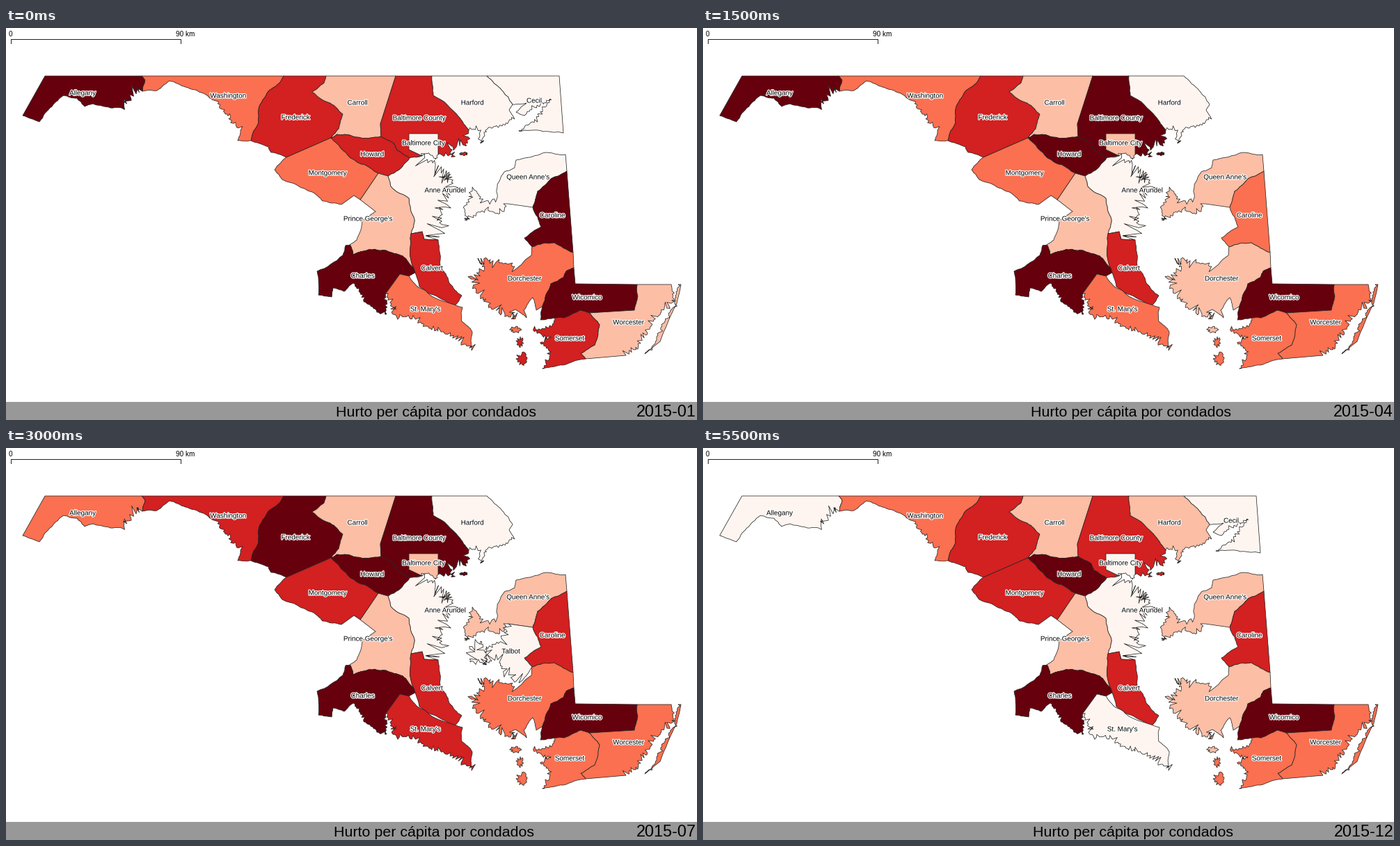
Animation, 993 px wide and 564 px high, one loop 6 s. Source, as a matplotlib script:

```python
import numpy as np
import matplotlib.pyplot as plt
from matplotlib.animation import FuncAnimation
from matplotlib.patches import PathPatch, Rectangle
from matplotlib.path import Path
from matplotlib.patheffects import withStroke

W, H, DPI = 993, 564, 96
PX = 72 / DPI
REDS = ["#fff5f0", "#fcbea5", "#fb7050", "#d32020", "#67000d"]
ABSENT = -1
INK = "#232323"
TOP = 69


def line(*xy):
    return np.array(xy, float).reshape(-1, 2)


def inward(d):
    """Normal pointing into a clockwise ring."""
    return np.stack([-d[:, 1], d[:, 0]], axis=1)


def rugged(*xy, rough=0.07):
    """Fractal line through key points, by midpoint displacement."""
    pts = line(*xy)
    rng = np.random.default_rng(int(pts.sum()))
    for _ in range(3):
        d = np.diff(pts, axis=0)
        mid = pts[:-1] + d / 2 + inward(d) * rng.uniform(-rough, rough, (len(d), 1))
        pts = np.insert(pts, np.arange(1, len(pts)), mid, axis=0)
    return pts


def creeks(*xy, depth=7, gap=2.3):
    """Coast with narrow slanted inlets of random depth."""
    base = rugged(*xy, rough=0.1)
    s = np.r_[0, np.cumsum(np.hypot(*np.diff(base, axis=0).T))]
    u = np.linspace(0, s[-1], 2 * int(s[-1] / gap / 2) + 1)
    pts = np.stack([np.interp(u, s, c) for c in base.T], axis=1)
    along = np.gradient(pts, axis=0)
    along /= np.hypot(*along.T)[:, None] + 1e-9
    rng = np.random.default_rng(int(base[0].sum()))
    push = depth * rng.uniform(-0.5, 1, (len(pts), 1))
    push[::2] = 0
    slant = push * rng.uniform(-0.6, 0.6, push.shape)
    return pts + push * inward(along) + slant * along


def island(x, y, w, h):
    a = np.linspace(0, 2 * np.pi, 24, endpoint=False)
    r = np.random.default_rng(int(x + y)).uniform(0.45, 1.15, len(a))
    return np.stack([x + w / 2 * r * np.cos(a), y + h / 2 * r * np.sin(a)], axis=1)


def ring(*parts):
    return np.vstack(parts)


def compound(rings):
    return Path.make_compound_path(*(Path(np.vstack([r, r[:1]]), closed=True) for r in rings))


# Shared borders
alle_wash = rugged(195, TOP, 200, 75, 196, 91)
wash_fred = rugged(399, TOP, 394, 78, 377, 91, 363, 117, 363, 136, 352, 162)
fred_carr = rugged(460, TOP, 457, 79, 440, 92, 466, 108, 484, 124, 478, 145, 467, 158)
fred_mont = line(467, 158, 403, 186)
carr_howa = rugged(467, 158, 476, 153, 503, 157, 539, 156)
carr_balt = line(560, TOP, 538, 138, 539, 156)
balt_harf = rugged(612, TOP, 614, 97, 651, 128, 665, 147)
balt_howa = rugged(539, 156, 558, 167, 562, 176, 580, 187)
mont_howa = rugged(467, 158, 495, 187, 535, 209)
howa_anne = rugged(580, 187, 565, 204, 549, 213)
howa_prin = line(535, 209, 549, 213)
mont_prin = line(535, 209, 512, 243)
prin_anne = rugged(549, 213, 553, 228, 579, 245, 587, 276, 582, 296)
prin_calv = rugged(582, 296, 586, 346)
prin_char = rugged(494, 312, 499, 326, 514, 321, 546, 320, 570, 328, 586, 346)
char_mary = line(545, 383, 566, 354, 579, 357)
anne_calv = line(582, 296, 598, 293, 601, 304, 621, 305)
harf_ceci = rugged(691, TOP, 713, 90, 728, 110)
quee_caro = rugged(806, 206, 783, 217, 764, 235, 757, 258)
quee_talb = line(757, 258, 722, 253)
talb_caro = rugged(757, 258, 769, 286, 745, 302, 756, 315)
caro_dorc = rugged(756, 315, 788, 309, 815, 323)
dorc_wico = rugged(816, 345, 805, 350, 801, 359, 783, 368, 771, 400)
wico_worc = rugged(907, 369, 908, 386, 903, 406)
wico_edge = line(903, 406, 838, 410)
wico_some = rugged(838, 410, 826, 406, 802, 417, 788, 417)
worc_some = rugged(838, 410, 853, 427, 846, 456, 826, 468, 833, 476)

shapes = {
    "Allegany": [ring(
        line(24, 126, 56, TOP), alle_wash, creeks(196, 91, 166, 115, depth=14),
        rugged(166, 115, 150, 115, 125, 109, 113, 113, 102, 101, 83, 97, 66, 113, 48, 135, 24, 126))],
    "Washington": [ring(
        wash_fred, rugged(352, 162, 333, 162, 337, 147), creeks(337, 147, 322, 128, 302, 105),
        rugged(302, 105, 284, 94, 258, 85, 235, 76, 217, 90, 196, 91), alle_wash[::-1])],
    "Frederick": [ring(
        fred_carr, fred_mont, rugged(403, 186, 381, 179, 377, 171, 352, 162), wash_fred[::-1])],
    "Carroll": [ring(carr_balt, carr_howa[::-1], fred_carr[::-1])],
    "Baltimore County": [
        ring(balt_harf, creeks(665, 147, 660, 166, 638, 174, 641, 186, 621, 182, depth=12),
             line(621, 160, 590, 160, 579, 175, 598, 184, 580, 187),
             balt_howa[::-1], carr_balt[::-1]),
        island(658, 181, 13, 5)],
    "Baltimore City": [ring(
        line(579, 175, 579, 152, 621, 152, 621, 182),
        creeks(621, 182, 619, 190, 604, 179, 598, 184, depth=5))],
    "Harford": [ring(
        harf_ceci, rugged(728, 110, 723, 118, 731, 131),
        creeks(731, 131, 692, 145, 682, 168, 679, 148, 665, 147), balt_harf[::-1])],
    "Cecil": [ring(
        harf_ceci[::-1], line(795, TOP, 801, 151), rugged(801, 151, 772, 149, 737, 148),
        creeks(737, 148, 760, 131, 784, 103, 745, 126, depth=6),
        rugged(745, 126, 733, 121, 748, 108, 728, 110))],
    "Howard": [ring(carr_howa, balt_howa, howa_anne, howa_prin[::-1], mont_howa[::-1])],
    "Montgomery": [ring(
        mont_howa, mont_prin, line(509, 247, 500, 241, 482, 254),
        rugged(482, 254, 455, 249, 440, 236, 397, 218, 386, 204, 403, 186), fred_mont[::-1])],
    "Anne Arundel": [ring(
        rugged(580, 187, 598, 184),
        creeks(598, 184, 620, 197, 639, 208, 643, 228, 636, 245, 624, 268, 625, 290, 621, 305,
               depth=22),
        anne_calv[::-1], prin_anne[::-1], howa_anne[::-1])],
    "Prince George's": [ring(
        howa_prin, prin_anne, prin_calv, prin_char[::-1],
        rugged(494, 312, 504, 305, 512, 277), line(531, 264, 509, 247), mont_prin[::-1])],
    "Queen Anne's": [ring(
        line(804, 182, 806, 206), quee_caro, quee_talb,
        creeks(722, 253, 708, 268, 690, 261, 658, 277, 671, 232, 690, 250, 706, 244, depth=9),
        rugged(706, 244, 706, 225, 716, 207, 731, 201, 733, 190, 776, 179, 804, 182))],
    "Caroline": [ring(quee_caro[::-1], line(815, 323), caro_dorc[::-1], talb_caro[::-1])],
    "Talbot": [
        ring(quee_talb[::-1], talb_caro, rugged(756, 315, 737, 338),
             creeks(737, 338, 715, 322, 706, 304, 690, 312, 688, 287, 710, 281, 722, 253, depth=15)),
        ring(creeks(690, 312, 667, 308, 666, 290, 682, 278, 690, 295, depth=11))],
    "Calvert": [ring(
        anne_calv, rugged(621, 305, 624, 342, 637, 367, 655, 385, 644, 401),
        rugged(644, 401, 622, 388, 594, 372, 586, 346), prin_calv[::-1])],
    "Charles": [ring(
        prin_char, line(588, 352, 579, 357), char_mary[::-1],
        creeks(545, 383, 547, 413, 527, 403, 511, 388, 499, 367, depth=4),
        rugged(499, 367, 486, 379, 470, 374, 468, 387, 449, 384, 447, 350, 484, 327, 488, 313,
               494, 312))],
    "St. Mary's": [ring(
        char_mary, rugged(579, 357, 590, 371, 612, 386, 656, 402),
        rugged(656, 402, 655, 422, 670, 437, 669, 464),
        creeks(669, 464, 634, 441, 598, 424, 577, 416, 556, 412, 545, 383, depth=10))],
    "Dorchester": [
        ring(caro_dorc, dorc_wico,
             rugged(771, 400, 762, 406, 757, 388, 744, 406, 748, 417, 732, 405),
             creeks(732, 405, 732, 420, 700, 405, 676, 379, 668, 357, 688, 348, 678, 331,
                    706, 338, 735, 345, depth=11),
             rugged(735, 345, 755, 327, 756, 315)),
        island(732, 434, 16, 10)],
    "Wicomico": [ring(
        line(816, 345, 818, 368, 907, 369), wico_worc, wico_edge, wico_some,
        rugged(788, 417, 768, 420, 771, 400), dorc_wico[::-1])],
    "Worcester": [
        ring(wico_worc[::-1],
             creeks(956, 369, 955, 398, 932, 420, 917, 446, 891, 471, depth=9),
             line(833, 476), worc_some[::-1], wico_edge[::-1]),
        ring(rugged(966, 369, 970, 369, 964, 396, 940, 451, 918, 469, rough=0.02),
             creeks(918, 469, 940, 436, 963, 388, 966, 369, depth=4))],
    "Somerset": [
        ring(wico_some,
             creeks(788, 417, 783, 431, 757, 434, 785, 445, 768, 454, 784, 466, 771, 490,
                    depth=5),
             rugged(771, 490, 805, 484, 833, 476), worc_some[::-1]),
        island(739, 452, 11, 14), island(742, 476, 17, 20)],
}

# Label centre, usual colour class and the months that depart from it
counties = {
    "Allegany": (110, 93, 4, {3: [2], 2: [7], 1: [8], 0: range(9, 13)}),
    "Washington": (319, 97, 2, {1: [3], 3: [5, 6, 7]}),
    "Frederick": (416, 128, 3, {4: [5, 6, 7]}),
    "Carroll": (505, 107, 1, {2: [5, 10]}),
    "Baltimore County": (593.5, 129, 4, {3: [1, 12]}),
    "Baltimore City": (600, 165, 0, {1: range(3, 8)}),
    "Harford": (670, 107, 0, {1: [12]}),
    "Cecil": (759, 104, 0, {ABSENT: range(4, 9)}),
    "Howard": (526, 181, 4, {3: [1]}),
    "Montgomery": (462, 208, 3, {2: range(1, 6)}),
    "Anne Arundel": (631, 233, 0, {1: [6]}),
    "Prince George's": (520, 274, 1, {2: [6]}),
    "Queen Anne's": (750, 214, 1, {0: [1]}),
    "Caroline": (785, 269, 3, {4: [1, 10, 11], 2: [3, 4, 5, 8]}),
    "Talbot": (725.5, 292, ABSENT, {0: range(6, 11)}),
    "Calvert": (612, 345, 3, {4: [5]}),
    "Charles": (512.5, 356, 4, {}),
    "St. Mary's": (602.5, 404, 2, {3: [6, 7, 10], 0: [12]}),
    "Dorchester": (745, 360, 2, {1: [3, 4, 12], 0: [5], 3: [6]}),
    "Wicomico": (835, 387, 4, {}),
    "Worcester": (894.5, 423, 2, {1: [1, 5]}),
    "Somerset": (810, 446, 2, {3: [1, 5], 0: [3]}),
}

fig = plt.figure(figsize=(W / DPI, H / DPI), dpi=DPI, facecolor="white")
ax = fig.add_axes([0, 0, 1, 1])
ax.set(xlim=(0, W), ylim=(H, 0))
ax.axis("off")


def text(x, y, s, size, **kw):
    return ax.text(x, y, s, fontsize=size * PX, family="Liberation Sans", color="black",
                   va="baseline", **kw)


halo = [withStroke(linewidth=2.4 * PX, foreground="white")]
areas, labels = {}, {}
for name, (x, y, *_) in counties.items():
    areas[name] = ax.add_patch(PathPatch(compound(shapes[name]), ec=INK, lw=0.75 * PX,
                                         joinstyle="round", zorder=2))
    labels[name] = text(x, y + 3.5, name, 9.9, ha="center", path_effects=halo, zorder=4)

ax.plot([6.5, 6.5, 250.5, 250.5], [21.5, 15.5, 15.5, 21.5], color=INK, lw=PX)
text(6.5, 12, "0", 10, ha="center")
text(258, 12, "90 km", 10, ha="center")

ax.add_patch(Rectangle((0, 538), W, 26, fc="#989898", lw=0, zorder=5))
title = text(471, 559, "Hurto per cápita por condados", 21.4, ha="left", zorder=6)
date = text(992, 559, "", 23.4, ha="right", zorder=6)


def level_at(name, month):
    *_, usual, departures = counties[name]
    return next((lv for lv, months in departures.items() if month in months), usual)


def draw(i):
    month = f"{i + 1:02d}"
    for name in counties:
        level = level_at(name, i + 1)
        areas[name].set_visible(level != ABSENT)
        labels[name].set_visible(level != ABSENT)
        areas[name].set_facecolor(REDS[max(level, 0)])
    # Each narrow "1" in the month moves the title right
    title.set_x(471 + 3 * month.count("1"))
    date.set_text(f"2015-{month}")
    return [*areas.values(), *labels.values(), title, date]


anim = FuncAnimation(fig, draw, frames=12, interval=500, repeat=True, repeat_delay=0)
plt.show()
```
